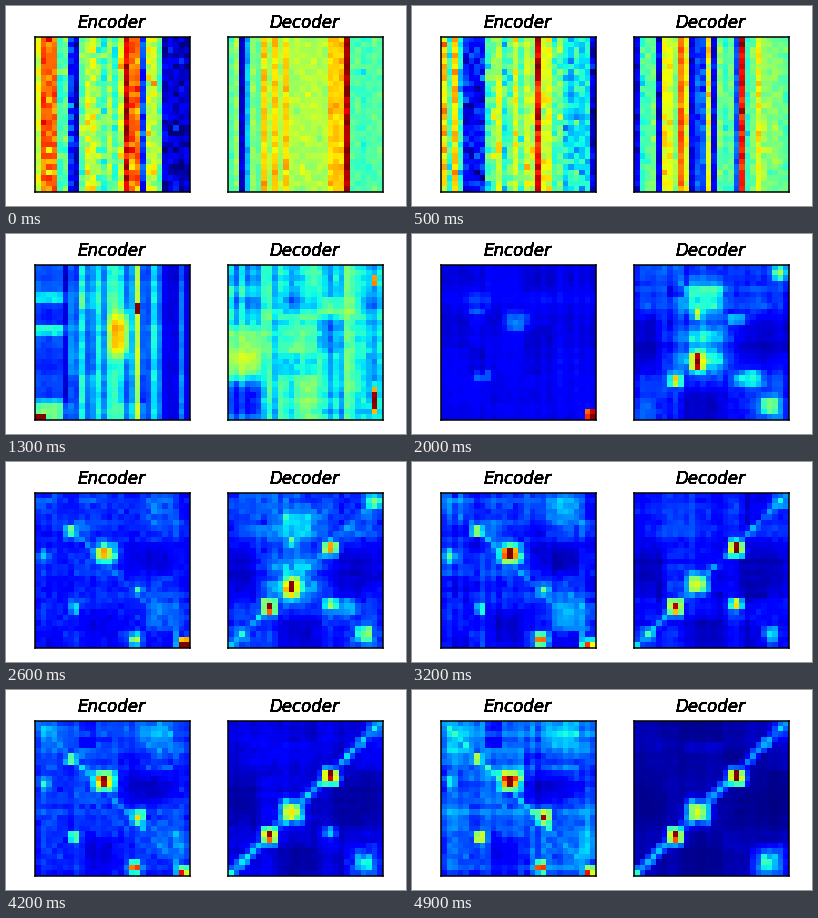
Animation, 400 px wide and 200 px high, one loop 6.5 s. Source, as a matplotlib script:

```python
import numpy as np
import matplotlib.pyplot as plt
from matplotlib.animation import FuncAnimation

N = 28
LAST_STEP = 49
FRAMES, INTERVAL = 65, 100
COL, ROW = np.meshgrid(np.arange(N), np.arange(N))
# Columns where a new word begins.
ENC_WORDS = (5, 8, 11, 15, 20, 25)
DEC_WORDS = (4, 6, 9, 16, 20, 24)


def bump(col, row, w, h):
    return np.exp(-((COL - col) / w) ** 4 - ((ROW - row) / h) ** 4)


def stripes(base, spread, groups, seed, grain):
    """Attention that ignores the query row; groups give a level to some columns."""
    rng = np.random.default_rng(seed)
    levels = base + spread * rng.uniform(-1, 1, N)
    for level, cols in groups.items():
        levels[list(cols)] = level
    return np.clip(levels + grain * rng.normal(size=(N, N)), 0, 1)


def weave(cells, words, seed, strength):
    """Vary the cells by word pair, row, column and single cell."""
    rng = np.random.default_rng(seed)
    word = np.searchsorted(words, np.arange(N), side="right")
    pairs = rng.normal(size=(7, 7))[word][:, word]
    noise = (0.2 * pairs + 0.16 * rng.normal(size=(1, N))
             + 0.12 * rng.normal(size=(N, 1)) + 0.1 * rng.normal(size=(N, N)))
    factor = np.clip(1 + strength * noise, 0.4, 1.7)
    return np.clip(cells * factor ** (1 - np.clip(cells, 0, 1)), 0, 1)


def brighten(cells, spots):
    for *place, level in spots:
        cells = cells + np.clip(level - cells, 0, 1) * bump(*place)
    return cells


def darken(cells, places):
    for place in places:
        cells = cells * (1 - 0.6 * bump(*place))
    return cells


def align(cells, points, levels):
    """Peaks with a wide halo and a narrow core."""
    for (col, row, size), level in zip(points, levels):
        halo = bump(col, row, size, size)
        core = bump(col, row, 0.45 * size, 0.45 * size)
        cells = np.maximum(cells, level * (0.55 * halo + 0.45 * core))
    return cells


def ridge(distance, level):
    return level * np.exp(-(distance / 1.5) ** 2)


def encoder_stages():
    haze = [(2.5, 2, 3.5, 3, 0.27), (22, 3, 3, 4.5, 0.29), (23, 20, 4, 4.5, 0.26)]
    shade = [(20, 11.5, 5, 3, ), (11.5, 24, 3.5, 4)]
    points = [(6, 6.5, 1.7), (12, 10.5, 2.5), (18, 17, 1.7), (17.5, 26, 1.7),
              (26.3, 27, 1.7), (6.5, 20.5, 1.9), (1, 11, 2.2)]

    start = stripes(0.45, 0.12, {
        0.77: [1, 2, 3, 17, 18], 0.9: [16], 0.58: [0, 9, 10, 15, 20, 21],
        0.18: [6, 19], 0.07: [7, *range(23, N)]}, 1, 0.05)
    early = stripes(0.45, 0.1, {
        0.67: [0, 2], 0.13: range(4, 8), 0.58: [10, 13, 15, 18, 19],
        0.88: [17], 0.34: range(22, 27), 0.08: [27]}, 2, 0.05)

    mixed = stripes(0.27, 0.07, {
        0.17: range(5), 0.09: [5, 23, 24, 25, 27],
        0.41: [8, 11, 13, 14, 15], 0.54: [18]}, 3, 0)
    mixed = brighten(mixed, [(2, 5.5, 3, 1.2, 0.34), (2, 11.5, 3, 1.2, 0.34),
                             (14.5, 12, 1.8, 4, 0.7), (18, 7.5, 0.6, 1, 1),
                             (2, 26, 3, 2, 0.5), (0.5, 27, 1, 0.6, 1)])
    mixed = weave(mixed, ENC_WORDS, 3, 0.5)

    dark = brighten(0.1 + 0 * COL, [(6, 6.5, 2, 2, 0.19), (13.5, 10, 2.3, 1.7, 0.22),
                                    (7, 19.5, 1.7, 1.2, 0.2), (26.7, 26.6, 1, 1, 1)])
    dark = weave(dark, ENC_WORDS, 4, 0.6)

    def aligned(base, levels, seed):
        cells = darken(brighten(base + 0 * COL, haze), shade)
        cells = np.maximum(cells, ridge(COL - ROW, 1.5 * base))
        return weave(align(cells, points, levels), ENC_WORDS, seed, 0.9)

    middle = aligned(0.17, (0.58, 1, 0.55, 0.85, 0.88, 0.4, 0.4), 5)
    final = aligned(0.22, (0.68, 1, 0.95, 0.88, 0.9, 0.68, 0.42), 6)
    return [start, early, mixed, dark, middle, final]


def decoder_stages():
    shade = [(2, 14, 3, 5), (12, 25, 4, 3.5), (23, 14, 5, 5)]
    points = [(7, 20.3, 1.8), (11, 16, 2.7), (18, 9.5, 1.9), (26, 1, 2.2),
              (2, 25, 2.2), (24, 25, 3.4), (18, 19.5, 1.7)]

    start = stripes(0.47, 0.06, {
        0.06: [2], 0.32: [3], 0.56: range(7, 18), 0.69: [6, 8, 10, 18, 19, 20],
        0.97: [21]}, 8, 0.025)
    early = stripes(0.45, 0.07, {
        0.1: [0, 4, 10, 14], 0.64: [5, 6, 9, 13, 22], 0.78: [8],
        0.21: [11, 12, 18], 0.88: [19]}, 9, 0.035)
    early[1, 19] = 1

    mixed = stripes(0.34, 0.07, {0.48: [6, 7, 15, 16, 21, 22]}, 10, 0)
    mixed = darken(mixed, [(2, 23.5, 4, 4)])
    mixed = brighten(mixed, [(2.5, 15, 3.4, 5, 0.57), (12, 14, 2, 6, 0.5),
                             (17.5, 7.5, 3.2, 2, 0.47), (14, 24, 2.6, 4, 0.47),
                             (26, 2.5, 0.7, 1, 0.8), (26, 24, 0.7, 2.5, 1)])
    mixed = weave(mixed, DEC_WORDS, 10, 0.7)

    blocks = darken(0.17 + 0 * COL, shade)
    blocks = brighten(blocks, [(12, 6, 3.9, 4, 0.37), (12, 14.5, 3.9, 4.5, 0.41),
                               (11, 8.5, 0.8, 1.1, 0.65), (11, 17, 1.6, 2, 0.62),
                               (11, 17, 0.6, 1.6, 1), (18, 9.5, 2, 1, 0.34),
                               (20, 20, 2.8, 1.6, 0.36)])
    blocks = align(blocks, points, (0.65, 0, 0, 0.5, 0.2, 0.45))
    blocks = weave(blocks, DEC_WORDS, 11, 0.8)

    def aligned(base, levels, seed):
        cells = darken(base + 0 * COL, shade)
        cells = np.maximum(cells, ridge(COL + ROW - 27, 0.26))
        return weave(align(cells, points, levels), DEC_WORDS[::1], seed, 0.9)

    middle = aligned(0.13, (0.88, 0.62, 0.98, 0.4, 0.32, 0.3, 0.58), 12)
    final = aligned(0.04, (0.92, 0.68, 1, 0.3, 0.04, 0.36, 0.04), 14)
    return [start, early, mixed, blocks, middle, final]


STEPS = [0, 5, 13, 20, 32, LAST_STEP]


def attention(stages, step):
    """Blend neighbouring stages, with a little training jitter in between."""
    i = min(np.searchsorted(STEPS, step, side="right") - 1, len(STEPS) - 2)
    u = (step - STEPS[i]) / (STEPS[i + 1] - STEPS[i])
    cells = (1 - u) * stages[i] + u * stages[i + 1]
    jitter = np.random.default_rng(step).normal(0, 0.08, (N, N))
    cells = cells * (1 + 4 * u * (1 - u) * jitter)
    return cells / cells.max()


def make_panel(left, title, stages):
    ax = fig.add_axes([left / 400, 14 / 200, 154.7 / 400, 155.3 / 200])
    image = ax.imshow(attention(stages, 0), cmap="jet", vmin=0, vmax=1,
                      interpolation="nearest", aspect="auto")
    ax.set(xticks=[], yticks=[])
    for spine in ax.spines.values():
        spine.set_linewidth(1.1)
    # Repeated drawing gives the lettering its heavy edges.
    for _ in range(10):
        ax.annotate(title, (0.5, 1), xycoords="axes fraction", xytext=(-0.5, 6),
                    textcoords="offset points", ha="center", va="baseline",
                    fontsize=12, style="italic", family="DejaVu Sans")
    return image


fig = plt.figure(figsize=(4, 2), dpi=100, facecolor="white")
panels = [(make_panel(left, title, stages), stages) for left, title, stages in (
    (29.3, "Encoder", encoder_stages()), (222.3, "Decoder", decoder_stages()))]


def update(frame):
    step = min(frame, LAST_STEP)
    for image, stages in panels:
        image.set_data(attention(stages, step))
    return [image for image, _ in panels]


anim = FuncAnimation(fig, update, frames=FRAMES, interval=INTERVAL,
                     repeat=True, repeat_delay=0, blit=False)
plt.show()
```
